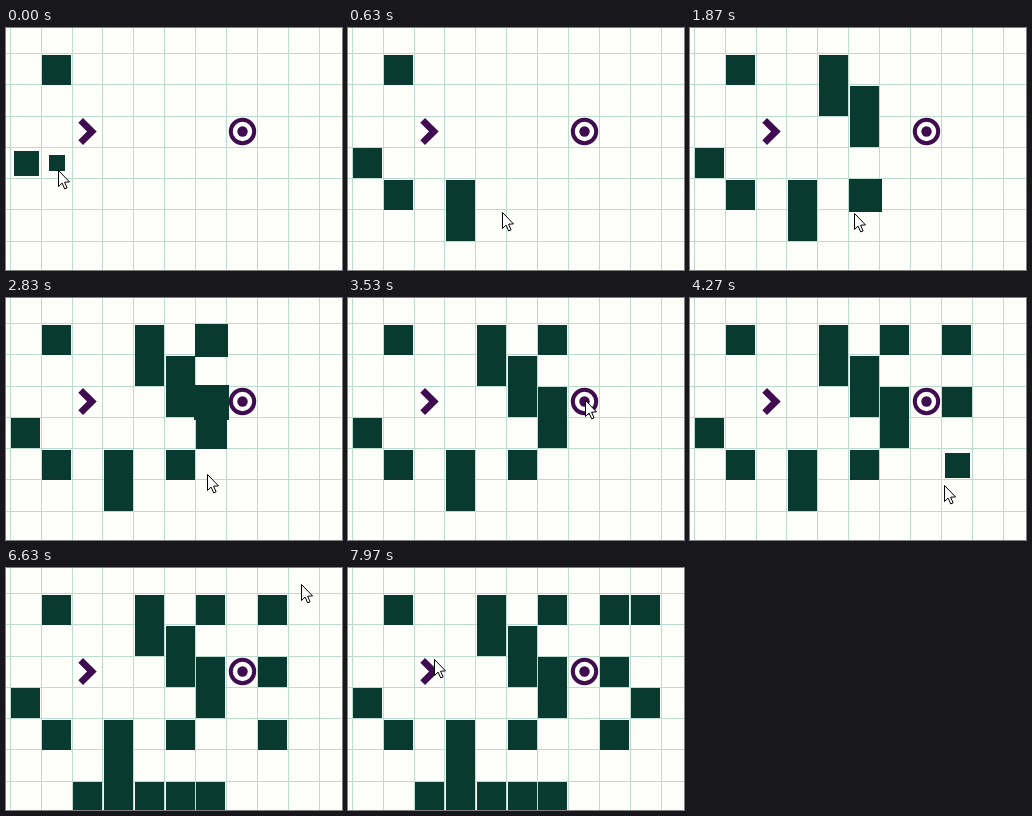
Recreate the animation shown at these times as an HTML page with a canvas. Size 336x242 px, loop 8 s.

```html
<!DOCTYPE html>
<html lang="en">
<head>
<meta charset="utf-8">
<title>Drawing walls on a grid</title>
<style>
html, body { margin: 0; width: 100%; height: 100%; overflow: hidden; background: #fefefa; }
canvas { display: block; width: 336px; height: 242px; }
</style>
</head>
<body>
<canvas id="stage" width="336" height="242"></canvas>
<script>
const ctx = document.getElementById('stage').getContext('2d');
const W = 336, H = 242, LOOP = 8000, POP = 200, COLS = 11, ROWS = 7;
const PAPER = '#fefefa', LINE = '#bcdccf', WALL = '#083a30', PURPLE = '#400c50';

const lineX = c => Math.floor(4.2 + 30.9 * c);
const lineY = r => Math.floor(25.4 + 31.3 * r);
const cellX = c => Math.floor(5.5 + 30.9 * c);
const cellY = r => Math.round(26.7 + 31.2 * r);

// A drag sweeps over cells, quick at first and slowing down
const walls = [];
function sweep(start, time, cells, place) {
  const first = cells[0], span = cells[cells.length - 1] - first || 1;
  for (const n of cells) {
    const [c, r] = place(n);
    walls.push({ c, r, on: start + time * ((n - first) / span) ** 2, off: LOOP });
  }
}
const down = (start, time, c, rows) => sweep(start, time, rows, r => [c, r]);
const across = (start, time, r, cols) => sweep(start, time, cols, c => [c, r]);
const erase = (t, c, r) => { walls.find(w => w.c === c && w.r === r).off = t; };

down(-900, 0, 1, [0]);
across(-40, 25, 3, [0, 1]);
erase(70, 1, 3);
down(90, 0, 1, [4]);
down(330, 60, 3, [4, 5]);
down(1360, 60, 4, [0, 1]);
down(1480, 265, 5, [1, 2, 4]);
down(2700, 65, 6, [0, 2, 3]);
down(4060, 167, 8, [0, 2, 4]);
across(5410, 60, 6, [2, 3, 4, 5, 6]);
down(7060, 90, 9, [0, 3]);

// Pointer stops: arrival time, x, y, longest travel time
const stops = [
  [0, 53, 143], [150, 48, 168], [630, 155, 185], [1240, 143, 17], [1560, 172, 94],
  [1870, 165, 186], [2500, 206, 51], [2830, 202, 177, 140], [3070, 196, 198],
  [3770, 268, 36, 540], [4270, 255, 188, 220], [4700, 53, 225], [5570, 242, 235, 170],
  [5970, 282, 230], [6630, 296, 17, 630], [7430, 290, 209], [7970, 87, 92, 340]
];

const easeOut = t => 1 - Math.pow(1 - t, 1.7);
const smooth = t => t * t * (3 - 2 * t);

function popScale(age) {
  const p = age / POP * 2;
  if (p >= 2) return 1;
  return p < 1 ? 0.3 + 0.9 * easeOut(p) : 1.2 - 0.2 * easeOut(p - 1);
}

function pointerAt(t) {
  const i = stops.findIndex(s => s[0] > t);
  if (i < 0) return stops[stops.length - 1].slice(1, 3);
  const [t0, x0, y0] = stops[i - 1], [t1, x1, y1, travel = 480] = stops[i];
  const begin = Math.max(t0, t1 - travel);
  const u = smooth(Math.max(0, (t - begin) / (t1 - begin)));
  return [x0 + (x1 - x0) * u, y0 + (y1 - y0) * u];
}

function polygon(points) {
  ctx.beginPath();
  points.forEach(([x, y]) => ctx.lineTo(x, y));
  ctx.closePath();
}

function drawGrid() {
  ctx.fillStyle = PAPER;
  ctx.fillRect(0, 0, W, H);
  ctx.fillStyle = LINE;
  for (let c = 0; c < COLS; c++) ctx.fillRect(lineX(c), 0, 1, H);
  for (let r = 0; r < ROWS; r++) ctx.fillRect(0, lineY(r), W, 1);
}

function drawWalls(t) {
  const live = walls.filter(w => t >= w.on && t < w.off);
  ctx.fillStyle = WALL;
  for (const { c, r, on } of live) {
    const s = popScale(t - on), x = cellX(c), y = cellY(r);
    if (s === 1) {
      const joined = live.some(w => w.c === c && w.r === r + 1 && t - w.on >= POP);
      ctx.fillRect(x, y, 29, joined ? cellY(r + 1) - y : 30);
    } else {
      const size = Math.round(29.5 * s);
      ctx.fillRect(Math.round(x + 15 - size / 2), Math.round(y + 15.3 - size / 2), size, size);
    }
  }
}

function drawIcons() {
  ctx.fillStyle = ctx.strokeStyle = PURPLE;
  polygon([[72.3, 94.7], [77, 90], [90.7, 103.5], [77, 117], [72.3, 112.3], [81, 103.5]]);
  ctx.fill();
  ctx.lineWidth = 4;
  ctx.beginPath();
  ctx.arc(236.5, 103.5, 11.7, 0, Math.PI * 2);
  ctx.stroke();
  ctx.beginPath();
  ctx.arc(236.5, 103.5, 5.2, 0, Math.PI * 2);
  ctx.fill();
}

function drawPointer(t) {
  const [x, y] = pointerAt(t);
  ctx.save();
  ctx.translate(Math.round(x) - 0.5, Math.round(y) - 0.5);
  polygon([[0, 0], [0, 16], [3.6, 12.6], [6.2, 18.4], [8.6, 17.4], [6.1, 11.7], [11, 11.4]]);
  ctx.fillStyle = '#fff';
  ctx.strokeStyle = '#000';
  ctx.lineWidth = 1;
  ctx.fill();
  ctx.stroke();
  ctx.restore();
}

function frame() {
  const t = performance.now() % LOOP;
  drawGrid();
  drawWalls(t);
  drawIcons();
  drawPointer(t);
  requestAnimationFrame(frame);
}
frame();
</script>
</body>
</html>
```
